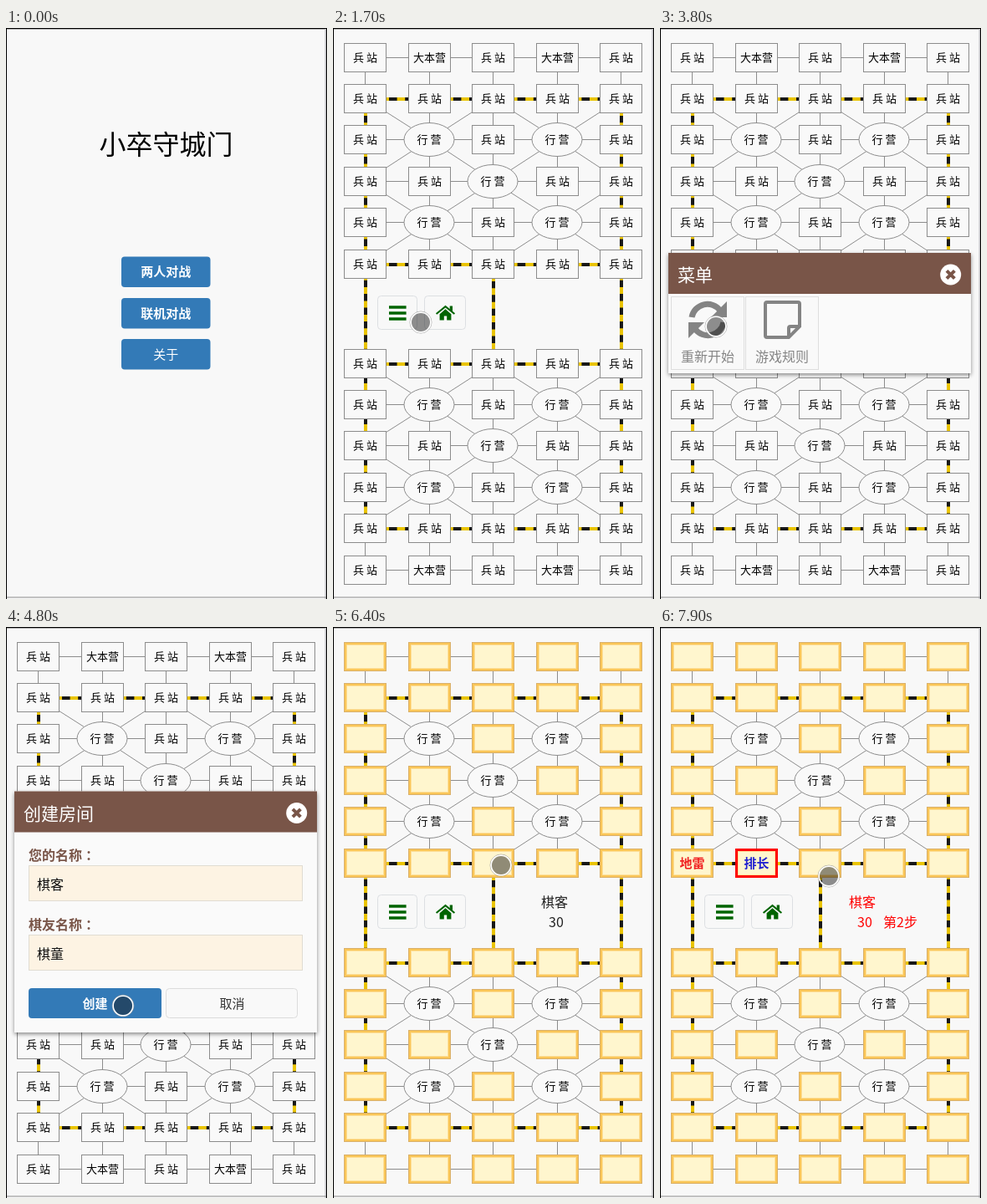
Write an HTML page that moves like this. It is 384 by 683 pixels and loops after 8000 ms.

```html
<!DOCTYPE html>
<html lang="zh-CN">
<head>
<meta charset="utf-8">
<title>小卒守城门</title>
<style>
html, body { margin: 0; width: 100%; height: 100%; overflow: hidden; background: #f8f8f8; }
svg { display: block; width: 100%; height: 100%; font-family: "Noto Sans CJK SC", "Noto Sans CJK", "Noto Sans", sans-serif; }
.colon { font-family: "Noto Sans CJK TC", "Noto Sans CJK", sans-serif; }
.scene { animation: 8s step-end infinite; }
#home { animation-name: home; }
#board { animation-name: board; }
#stations { animation-name: stations; }
#pieces { animation-name: pieces; }
#menu { animation-name: menu; }
#create { animation-name: create; }
#wait30 { animation-name: wait30; }
#wait29 { animation-name: wait29; }
#step1 { animation-name: step1; }
#step2 { animation-name: step2; }
@keyframes home { 0% { opacity: 1 } 13.75%, 100% { opacity: 0 } }
@keyframes board { 0% { opacity: 0 } 13.75%, 100% { opacity: 1 } }
@keyframes stations { 0% { opacity: 1 } 71.25%, 100% { opacity: 0 } }
@keyframes pieces { 0% { opacity: 0 } 71.25%, 100% { opacity: 1 } }
@keyframes menu { 0% { opacity: 0 } 28.75% { opacity: 1 } 51.25%, 100% { opacity: 0 } }
@keyframes create { 0% { opacity: 0 } 51.25% { opacity: 1 } 68.75%, 100% { opacity: 0 } }
@keyframes wait30 { 0% { opacity: 0 } 71.25% { opacity: 1 } 83.75%, 100% { opacity: 0 } }
@keyframes wait29 { 0% { opacity: 0 } 83.75% { opacity: 1 } 87.5%, 100% { opacity: 0 } }
@keyframes step1 { 0% { opacity: 0 } 87.5% { opacity: 1 } 95%, 100% { opacity: 0 } }
@keyframes step2 { 0% { opacity: 0 } 95%, 100% { opacity: 1 } }

/* The pointer advances in 100 ms ticks. */
#pointer { animation: pointer 8s linear infinite; }
@keyframes pointer {
  0% { transform: translate(366px, 107px); opacity: 0; animation-timing-function: step-end }
  1.25% { transform: translate(366px, 107px); opacity: 1; animation-timing-function: steps(5) }
  7.5% { transform: translate(192px, 311px); animation-timing-function: steps(2) }
  10%, 17.5% { transform: translate(203px, 290px); animation-timing-function: steps(3) }
  21.25% { transform: translate(105px, 352px); animation-timing-function: steps(4) }
  26.25%, 27.5% { transform: translate(83px, 352px); animation-timing-function: steps(5) }
  33.75% { transform: translate(111px, 373px); animation-timing-function: steps(4) }
  38.75%, 41.25% { transform: translate(115px, 378px); animation-timing-function: steps(5) }
  47.5%, 50% { transform: translate(67px, 357px); animation-timing-function: steps(8) }
  60%, 75% { transform: translate(140px, 453px); animation-timing-function: steps(4) }
  80% { transform: translate(201px, 285px); animation-timing-function: steps(5) }
  86.25% { transform: translate(68px, 291px); animation-timing-function: steps(5) }
  92.5%, 93.75% { transform: translate(130px, 296px); animation-timing-function: steps(4) }
  98.75%, 100% { transform: translate(202px, 298px); opacity: 1 }
}
</style>
</head>
<body>
<svg id="stage" viewBox="0 0 384 683" preserveAspectRatio="none"></svg>
<script>
const cols = [38.5, 115.5, 191.5, 268.5, 344.5];
const rows = [35.5, 84.5, 133.5, 183.5, 232.5, 282.5, 401.5, 450.5, 499.5, 549.5, 598.5, 648.5];
const blue = '#337ab7', brown = '#795548', grey = '#848484', green = '#006400';

const rect = (x, y, w, h, fill, stroke = 'none', r = 0, sw = 1) =>
  `<rect x="${x}" y="${y}" width="${w}" height="${h}" rx="${r}" fill="${fill}" stroke="${stroke}" stroke-width="${sw}"/>`;
const path = (d, stroke, w, more = '') =>
  `<path d="${d}" fill="none" stroke="${stroke}" stroke-width="${w}" ${more}/>`;
const scene = (id, body) => `<g id="${id}" class="scene">${body}</g>`;

// y is the middle of the glyphs
const text = (s, x, y, size, fill = '#000', anchor = 'middle', weight = 400) =>
  `<text x="${x}" y="${y + size * 0.38}" font-size="${size}" fill="${fill}" text-anchor="${anchor}" font-weight="${weight}" xml:space="preserve">${s}</text>`;

const button = (s, x, y, w, h, weight = 400) =>
  rect(x, y, w, h, blue, 'none', 4) + text(s, x + w / 2, y + h / 2, 15, '#fff', 'middle', weight);

function isCamp(c, r) {
  const k = r < 6 ? r : 11 - r;
  return c === 2 ? k === 3 : c % 2 === 1 && (k === 2 || k === 4);
}

function eachCell(draw) {
  return rows.map((y, r) => cols.map((x, c) => draw(x, y, c, r)).join('')).join('');
}

function roads() {
  let d = '';
  rows.forEach((y, r) => {
    d += `M${cols[0]} ${y}H${cols[4]}`;
    if (r !== 5 && r !== 11) cols.forEach(x => d += `M${x} ${y}V${rows[r + 1]}`);
  });
  eachCell((x, y, c, r) => {
    if (isCamp(c, r))
      for (const i of [-1, 1]) for (const j of [-1, 1])
        if (j > 0 || !isCamp(c + i, r + j)) d += `M${x} ${y}L${cols[c + i]} ${rows[r + j]}`;
    return '';
  });
  return path(d, '#8c8c8c', 1);
}

function rails() {
  const across = [1, 5, 6, 10].map(r => `M${cols[0]} ${rows[r] + .5}H${cols[4]}`).join('');
  const down = [0, 4].map(c => `M${cols[c] + .5} ${rows[1]}V${rows[10]}`).join('') +
    `M${cols[2] + .5} ${rows[5]}V${rows[6]}`;
  return path(across + down, '#eac400', 4) +
    path(across, '#181818', 4, 'stroke-dasharray="9.6 9.6" stroke-dashoffset="9.9"') +
    path(down, '#181818', 4, 'stroke-dasharray="8.4 8" stroke-dashoffset="-4"');
}

const camps = eachCell((x, y, c, r) => isCamp(c, r)
  ? `<ellipse cx="${x - .5}" cy="${y}" rx="30" ry="20" fill="#f9f9f9" stroke="#8c8c8c"/>` + text('行 营', x - .5, y, 13)
  : '');

const stations = eachCell((x, y, c, r) => {
  if (isCamp(c, r)) return '';
  const base = c % 2 === 1 && r % 11 === 0;
  return rect(x - 25, y - 17, 50, 34, '#f9f9f9', '#8c8c8c') + text(base ? '大本营' : '兵 站', x, y, 13);
});

function piece(x, y, label = '', color = '', picked = false) {
  return rect(x - 25, y - 17, 50, 34, '#fff6ce', '#d9b06a') +
    rect(x - 23.5, y - 15.5, 47, 31, 'none', '#fac658', 0, 2) +
    rect(x - 22, y - 14, 44, 28, 'none', '#fde09a') +
    (picked ? rect(x - 24, y - 16, 48, 32, 'none', '#f00', 0, 3) : '') +
    (label ? text(label, x, y, 15, color, 'middle', 700) : '');
}
const pieces = eachCell((x, y, c, r) => isCamp(c, r) ? '' : piece(x, y));
const mine = picked => piece(cols[0], rows[5], '地雷', '#f02020', picked);
const platoon = piece(cols[1], rows[5], '排长', '#2020d0', true);

const waiting = n => text('棋客', 249, 329, 16, '#222', 'start') + text(n, 258, 353, 16, '#222', 'start');
const turn = (name, n, color) => text(name, 226, 329, 16, color, 'start') +
  text('30', 236, 353, 16, color, 'start') + text(`第${n}步`, 267, 353, 16, color, 'start');

const tools = rect(53.5, 320.5, 47, 40, '#f8f8f8', '#dcdfe2', 4) + rect(109.5, 320.5, 49, 40, '#f8f8f8', '#dcdfe2', 4) +
  path('M67 334H87.600M67 341H87.600M67 348H87.600', green, 3.400) +
  path('M123.600 342L134.500 333.200L145.400 342', green, 2.100) +
  `<path d="M139.700 332.500H143V340L139.700 337ZM127.600 342.300L134.500 336.300L141.400 342.300V349.600H136.200V344.400H132.800V349.600H127.600Z" fill="${green}"/>`;

function dialog(y, h, title, body) {
  const cy = y + 26;
  return `<g filter="url(#shadow)">${rect(10, y, 362, h, '#fafafa')}</g>` +
    rect(10, y, 362, 49, brown) + text(title, 21, cy + .5, 21, '#fff', 'start') +
    `<circle cx="347.700" cy="${cy}" r="12.500" fill="#fff"/>` +
    path(`M343 ${cy - 4.7}l9.400 9.400m0 -9.400l-9.400 9.400`, brown, 4) + body;
}

const tile = (x, label) => rect(x + .5, 321.5, 87, 87, '#f9f9f9', '#dedede') + text(label, x + 44, 393, 16, '#858585');

const menu = dialog(269, 144, '菜单',
  tile(13, '重新开始') + tile(102, '游戏规则') +
  path('M38 346A19 19 0 0 1 72 338M76 352A19 19 0 0 1 42 360', grey, 7) +
  `<path d="M80 327V346H61ZM34 371V352H53Z" fill="${grey}"/>` +
  path('M128 328H165a2 2 0 0 1 2 2V357L154 370H128a2 2 0 0 1-2-2V330a2 2 0 0 1 2-2ZM154 370V359a2 2 0 0 1 2-2H167', grey, 4));

const field = (label, value, y) =>
  text(label + '<tspan class="colon" lang="zh-TW">：</tspan>', 27, y, 16, brown, 'start', 700) +
  rect(27.5, y + 12.5, 327, 42, '#fdf3e3', '#e0dcd2') + text(value, 37, y + 35, 16, '#111', 'start');

const create = dialog(196.5, 288.5, '创建房间',
  field('您的名称', '棋客', 273) + field('棋友名称', '棋童', 356) +
  button('创建', 27, 432, 159, 36, 700) +
  rect(191.5, 432.5, 157, 35, '#f9f9f9', '#dcdcdc', 4) + text('取消', 270.5, 450, 15, '#333'));

const home = text('小卒守城门', 191.5, 138.5, 32, '#000', 'middle', 300) +
  button('两人对战', 138, 273.5, 106.5, 36.5, 700) +
  button('联机对战', 138, 323, 106.5, 36.5, 700) +
  button('关于', 138, 372, 106.5, 36.5);

const frame = rect(0, 0, 384, 1.3, '#000') + rect(0, 0, 1, 683, '#000') +
  rect(381.5, 1, 1.5, 682, '#c4c4c8') + rect(383, 0, 1, 683, '#000') + rect(1, 680.5, 382, 1, '#8a8a8a');

const pointer = `<g id="pointer"><circle r="13" fill="none" stroke="#999" stroke-opacity=".7"/>
  <circle r="11.800" fill="none" stroke="#fff" stroke-width="1.600"/>
  <circle r="11" fill="#141414" fill-opacity=".47"/></g>`;

document.getElementById('stage').innerHTML =
  `<defs><filter id="shadow" x="-10%" y="-10%" width="120%" height="125%">
    <feDropShadow dx="0" dy="2" stdDeviation="2.500" flood-opacity=".45"/></filter></defs>` +
  rect(0, 0, 384, 683, '#f8f8f8') +
  scene('home', home) +
  scene('board', roads() + rails() + camps + scene('stations', stations) + scene('pieces', pieces) + tools) +
  scene('wait30', waiting('30')) + scene('wait29', waiting('29')) +
  scene('step1', mine(true) + turn('棋童', 1, '#00f')) +
  scene('step2', mine(false) + platoon + turn('棋客', 2, '#f00')) +
  scene('menu', menu) + scene('create', create) + frame + pointer;
</script>
</body>
</html>
```
